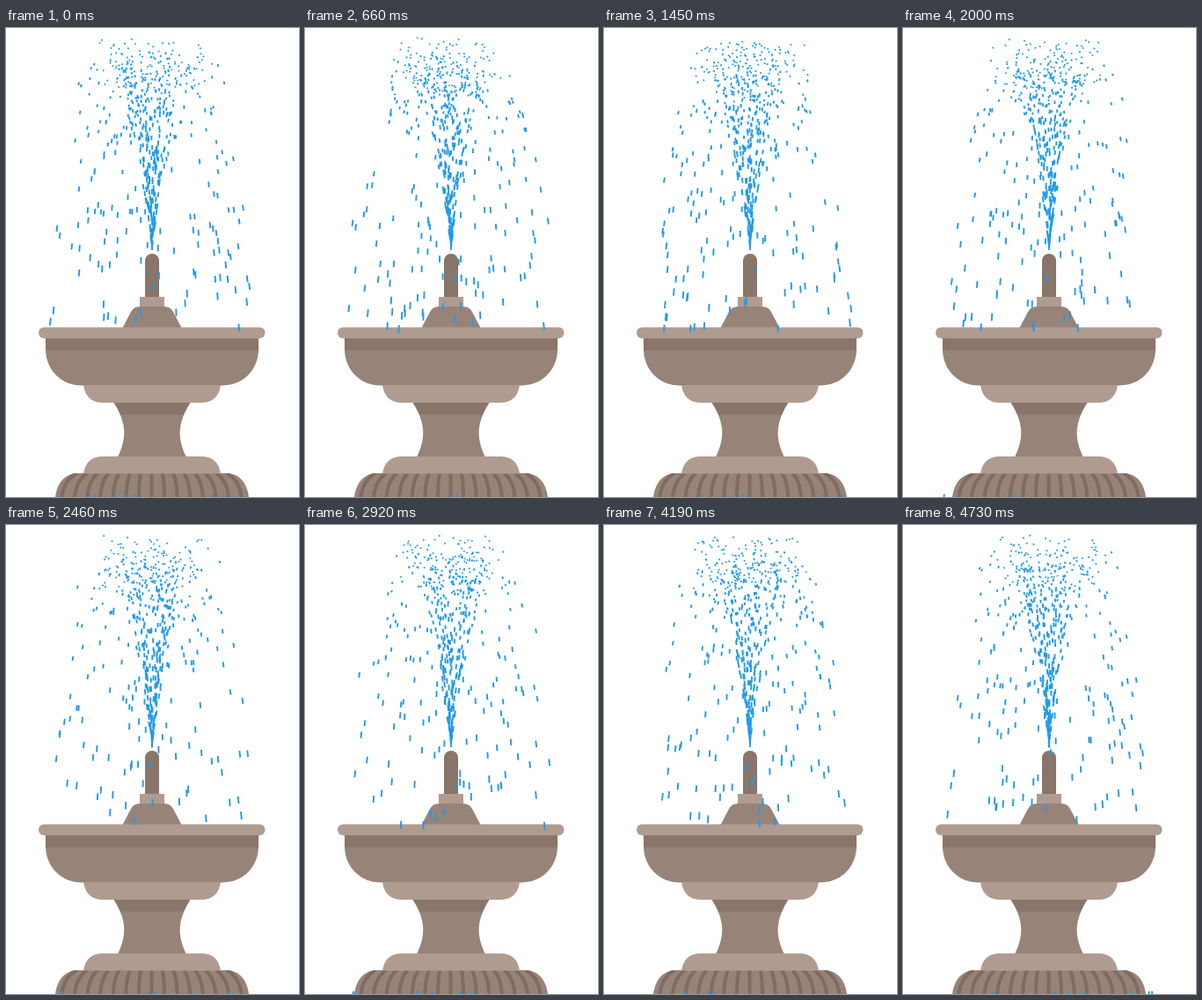
Animation of 333x532 px, one loop 4.83 s. Source, as an HTML page with a canvas:

```html
<!DOCTYPE html>
<html lang="en">
<head>
<meta charset="utf-8">
<title>Fountain</title>
<style>
  html, body { margin: 0; width: 100%; height: 100%; overflow: hidden; background: #fff; }
  svg, canvas { position: absolute; left: 0; top: 0; width: 333px; height: 532px; }
  .light { fill: #b09b90; }
  .mid { fill: #978378; }
  .dark { fill: #897569; }
  #flutes path { fill: none; stroke: #7f6b60; stroke-width: 4; }
</style>
</head>
<body>
<svg viewBox="0 0 333 532">
  <clipPath id="foot"><path d="M56 532C58 517 66 505 82 505H250C266 505 274 517 276 532Z"/></clipPath>
  <path class="dark" d="M158 310V264a8 8 0 0 1 16 0V310Z"/>
  <rect class="light" x="152" y="305" width="28" height="12"/>
  <path class="mid" d="M132 341L142 322Q145 316 152 316H180Q187 316 190 322L200 341Z"/>
  <path class="mid" d="M45 351H287V364C287 388 269 405.500 246 405.500H86C63 405.500 45 388 45 364Z"/>
  <rect class="dark" x="45" y="351" width="242" height="14.5"/>
  <rect class="light" x="37" y="339.5" width="257.5" height="12.5" rx="6.2"/>
  <path class="mid" d="M122 424H210C194 449 195 466 205 487H127C137 466 138 449 122 424Z"/>
  <path class="dark" d="M122 424H210Q205 431 202 438.500H130Q127 431 122 424Z"/>
  <path class="light" d="M88 405H244Q241 425 222 425H110Q91 425 88 405Z"/>
  <g clip-path="url(#foot)">
    <rect class="mid" x="50" y="500" width="232" height="32"/>
    <g id="flutes"></g>
  </g>
  <path class="light" d="M88 505.500Q91 486 110 486H222Q241 486 244 505.500Z"/>
</svg>
<canvas id="water" width="333" height="532"></canvas>
<script>
const LOOP = 4830, STEP = 30, COUNT = 1200;
const HOLDS = [[1450, 1550], [4730, 4830]];
const NOZZLE = { x: 166, y: 249 };
const RISE = 1.35, HEIGHT = 238, SPREAD = 43.5;
const SPEED = 2 * HEIGHT / RISE, GRAVITY = SPEED / RISE;
const RIM = 342, SPLASH = 0.035, STREAK = 0.022;

const flutes = document.getElementById('flutes');
for (let i = -7; i <= 7; i++) {
  const path = document.createElementNS('http://www.w3.org/2000/svg', 'path');
  const top = 165.5 + i * 12.2, foot = 165.5 + i * 14.6;
  path.setAttribute('d', `M${top} 505Q${foot - i * 0.3} 513 ${foot} 533`);
  flutes.append(path);
}

let seed = 71;
function random() {
  seed = (seed + 0x6d2b79f5) | 0;
  let n = Math.imul(seed ^ (seed >>> 15), 1 | seed);
  n ^= n + Math.imul(n ^ (n >>> 7), 61 | n);
  return ((n ^ (n >>> 14)) >>> 0) / 4294967296;
}

const drops = Array.from({ length: COUNT }, (_, i) => {
  const vx = SPREAD * (random() * 2 - 1);
  const vy = SPEED * (0.88 + 0.12 * random());
  const land = (vy + Math.sqrt(vy * vy + 2 * GRAVITY * (RIM - NOZZLE.y))) / GRAVITY;
  const fades = random() < 0.38;
  return {
    birth: (i + random()) * LOOP / COUNT,
    vx, vy, land,
    end: fades ? RISE * (0.75 + 0.5 * random()) : land + SPLASH
  };
});

const ctx = document.getElementById('water').getContext('2d');
ctx.strokeStyle = '#2199ec';
ctx.lineWidth = 1.9;

function line(x, y, dx, dy) {
  ctx.moveTo(x - dx, y - dy);
  ctx.lineTo(x + dx, y + dy);
}

function draw(ms) {
  ctx.clearRect(0, 0, 333, 532);
  ctx.beginPath();
  for (const d of drops) {
    const age = (ms - d.birth + LOOP) % LOOP / 1000;
    if (age > d.end) continue;
    const x = NOZZLE.x + d.vx * age;
    if (age > d.land) {
      line(x, 531, 0.2 * Math.sign(d.vx), 2.2);
      continue;
    }
    const vy = GRAVITY * age - d.vy;
    const y = NOZZLE.y - d.vy * age + GRAVITY * age * age / 2;
    const speed = Math.hypot(d.vx, vy);
    const half = Math.max(1.7, speed * STREAK) / 2 / speed;
    line(x, y, d.vx * half, vy * half);
  }
  ctx.stroke();
}

function shownTime(ms) {
  const hold = HOLDS.find(([from, to]) => ms >= from && ms < to);
  return hold ? hold[0] : Math.floor(ms / STEP) * STEP;
}

const start = performance.now();
function tick() {
  draw(shownTime((performance.now() - start) % LOOP));
  requestAnimationFrame(tick);
}
tick();
</script>
</body>
</html>
```
